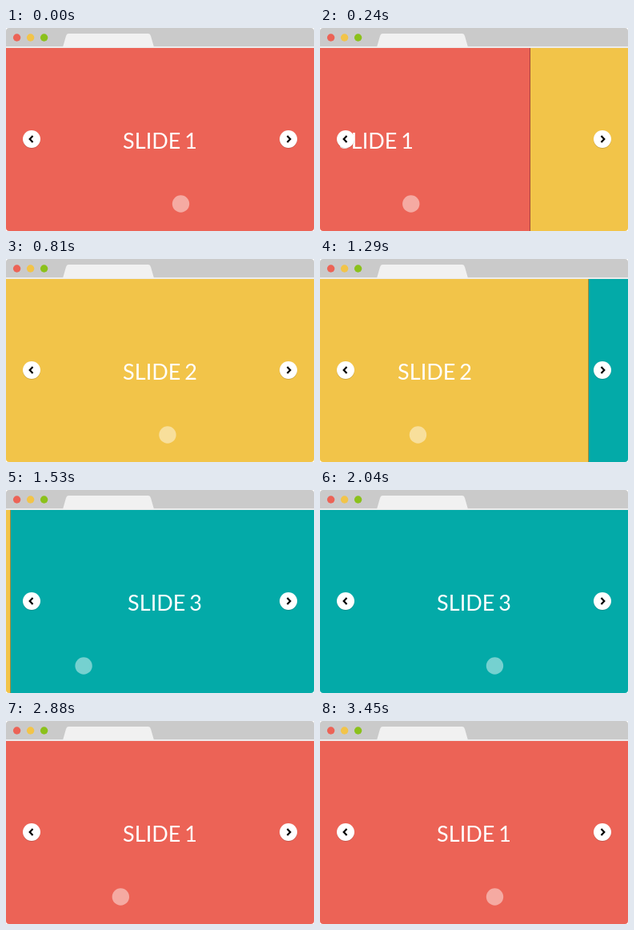
An HTML page with a canvas that plays this animation: 385x254 px, repeating every 4500 ms.

```html
<!DOCTYPE html>
<html lang="en">
<head>
<meta charset="utf-8">
<title>Slider</title>
<style>
  html, body { margin: 0; width: 100%; height: 100%; overflow: hidden; background: #fff; }
  canvas { display: block; }
</style>
</head>
<body>
<canvas id="stage" width="385" height="254"></canvas>
<script>
const W = 385, H = 254, LOOP = 4500;
const RED = '#ec6356', YELLOW = '#f2c449', TEAL = '#03aaa8';
const REST = 218.5, LEFT = 93.7, SLIDE_MS = 450;
const slides = [[RED, 'SLIDE 1'], [YELLOW, 'SLIDE 2'], [TEAL, 'SLIDE 3'], [RED, 'SLIDE 1']];

// Start times of the finger's swipe, the slide change and the finger's return
const swipes = [
  { swipe: 0, slide: 207, back: 362 },
  { swipe: 1066, slide: 1278, back: 1405 },
  { swipe: 2103, slide: 2295, back: 2698 }
];

const c = document.getElementById('stage').getContext('2d');
const progress = (t, start, length) => Math.min(1, Math.max(0, (t - start) / length));
const inOut = v => v < .5 ? 4 * v ** 3 : 1 - 4 * (1 - v) ** 3;
const quintOut = v => 1 - (1 - v) ** 5;
const softOut = v => 1 - (1 - v ** 1.5) ** 4;

function disc(x, y, r, color) {
  c.fillStyle = color;
  c.beginPath();
  c.arc(x, y, r, 0, 7);
  c.fill();
}

function fingerX(t) {
  const i = swipes.findLastIndex(s => t >= s.swipe);
  const { swipe, back } = swipes[i];
  const away = inOut(progress(t, swipe, 365));
  const home = i < 2 ? inOut(progress(t, back, 660)) : softOut(progress(t, back, 752));
  return REST + (LEFT - REST) * (away - home);
}

function drawSlides(t) {
  const pos = swipes.reduce((sum, s) => sum + quintOut(progress(t, s.slide, SLIDE_MS)), 0);
  c.font = '27px Lato, sans-serif';
  c.wordSpacing = '-2px';
  c.textAlign = 'center';
  slides.forEach(([color, label], i) => {
    const x = Math.round((i - pos) * W);
    if (Math.abs(x) >= W) return;
    c.fillStyle = 'rgba(0,0,0,.3)';
    c.fillRect(x - 1, 25, 1, H - 25);
    c.fillStyle = color;
    c.fillRect(x, 25, W, H - 25);
    c.fillStyle = '#fff';
    c.fillText(label, x + W / 2, 150.7);
  });
}

function drawArrow(x, dir) {
  disc(x, 139.8, 11, 'rgba(0,0,0,.2)');
  disc(x, 139, 11, '#fff');
  c.strokeStyle = '#000';
  c.lineWidth = 2.2;
  c.beginPath();
  c.moveTo(x - dir * 1.5, 135);
  c.lineTo(x + dir * 2.3, 139);
  c.lineTo(x - dir * 1.5, 143);
  c.stroke();
}

function drawBar() {
  c.fillStyle = '#cacaca';
  c.fillRect(0, 0, W, 23);
  c.fillStyle = '#ececec';
  c.fillRect(0, 23, W, 2);
  c.fillStyle = '#f1f1f1';
  c.beginPath();
  c.moveTo(71, 24);
  c.lineTo(75, 10);
  c.quadraticCurveTo(75.8, 7, 78, 7);
  c.lineTo(178, 7);
  c.quadraticCurveTo(180.2, 7, 181, 10);
  c.lineTo(185, 24);
  c.fill();
  [RED, YELLOW, '#8bc11b'].forEach((color, i) => disc(13.6 + i * 17, 12, 4.7, color));
}

function draw(now) {
  const t = now % LOOP;
  c.clearRect(0, 0, W, H);
  c.save();
  c.beginPath();
  c.roundRect(0, 0, W, H, 4);
  c.clip();
  drawSlides(t);
  drawBar();
  drawArrow(32, -1);
  drawArrow(353, 1);
  disc(fingerX(t), 220, 10.7, 'rgba(255,255,255,.45)');
  c.restore();
}

let start;
function tick(now) {
  start ??= now;
  draw(Math.max(0, now - start));
  requestAnimationFrame(tick);
}
draw(0);
requestAnimationFrame(tick);
</script>
</body>
</html>
```
